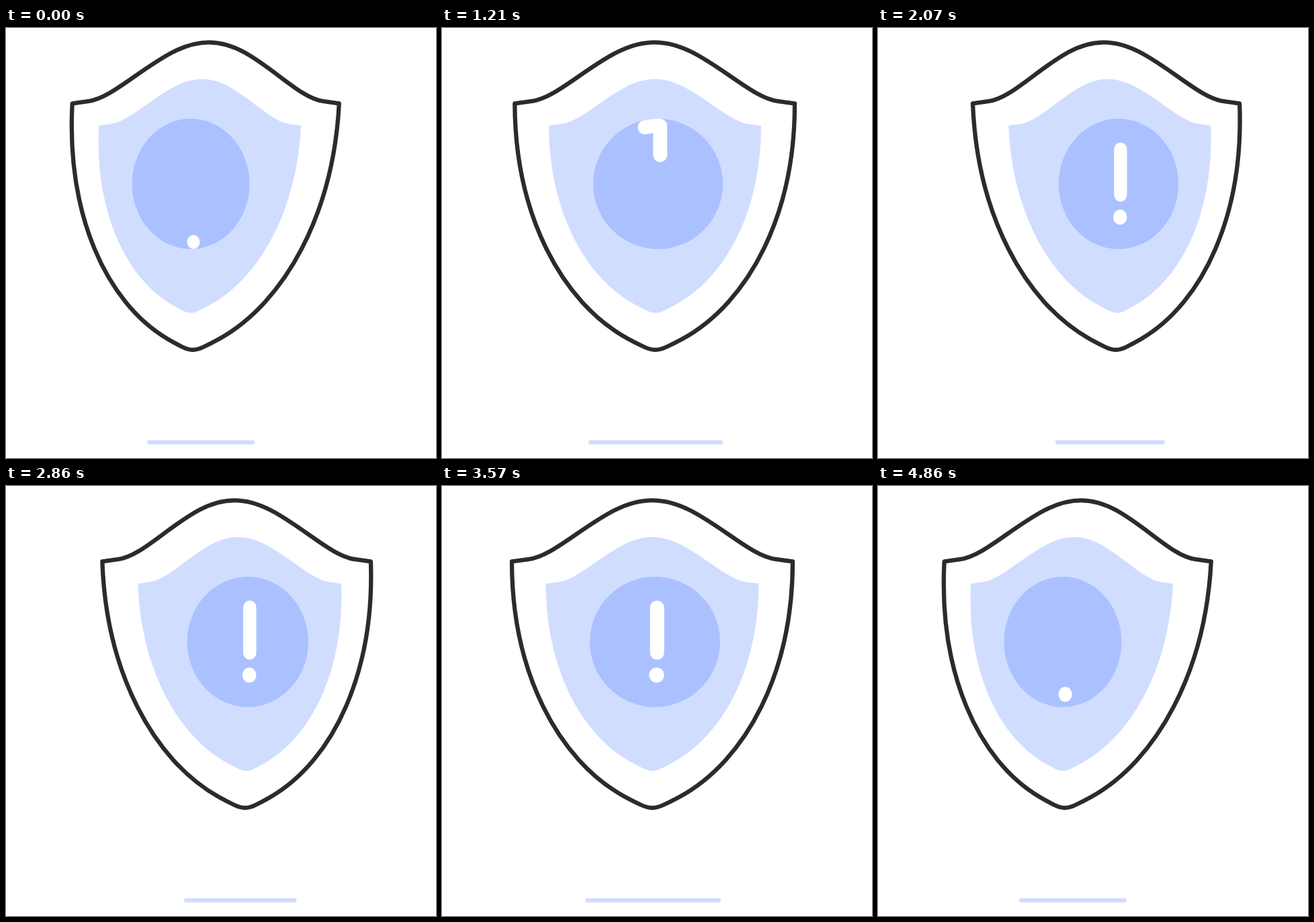
An HTML page for the animation above (4.93 s loop, 640 by 640 pixels).

```html
<!DOCTYPE html>
<html lang="en">
<head>
<meta charset="utf-8">
<title>Shield alert</title>
<style>
  html, body { margin: 0; width: 100%; height: 100%; overflow: hidden; background: #fff; }
  svg { display: block; width: 100%; height: 100%; }
</style>
</head>
<body>
<svg viewBox="0 0 640 640">
  <defs>
    <path id="shape" vector-effect="non-scaling-stroke" d="M-209 112.3L-185 109.2C-149 105 -107 62 -56 36C-37 26.5 -19 21.3 0 21.3
      C19 21.3 37 26.5 56 36C107 62 149 105 185 109.2L209 112.3
      C209 276 141 408 40 463Q28 469.500 16 475C10 477.700 5 479 0 479
      C-5 479 -10 477.700 -16 475Q-28 469.500 -40 463C-141 408 -209 276 -209 112.300Z"/>
  </defs>
  <path id="ground" fill="none" stroke="#d1ddff" stroke-width="6.2" stroke-linecap="round"/>
  <use id="outer" href="#shape" fill="#fff" stroke="#2b2a2d" stroke-width="6.3" stroke-linejoin="round"/>
  <use id="inner" href="#shape" fill="#d1ddff"/>
  <g id="badge">
    <circle r="97" fill="#abc1ff"/>
    <path id="line" fill="none" stroke="#fff" stroke-width="21" stroke-linecap="round" stroke-linejoin="round"
      d="M4.5 86.4A86.5 86.5 0 0 1 0 86.5A86.5 86.5 0 0 1 0 -86.5A86.5 86.5 0 0 1 0 86.5A86.5 86.5 0 0 1 0 -86.5A86.5 86.5 0 0 1 3.2 -86.4V49.5"/>
    <circle id="dot" fill="#fff"/>
  </g>
</svg>
<script>
const LOOP = 4930, TOP = 21.3, HEIGHT = 457.7;
const $ = id => document.getElementById(id);
const [ground, outer, inner, badge, line, dot] =
  ['ground', 'outer', 'inner', 'badge', 'line', 'dot'].map($);

// Smooth curve through [time, value] keys without overshoot.
function track(keys) {
  const n = keys.length - 1;
  const rise = i => (keys[i + 1][1] - keys[i][1]) / (keys[i + 1][0] - keys[i][0]);
  const slope = keys.map((_, i) => {
    if (i === 0 || i === n) return 0;
    const a = rise(i - 1), b = rise(i);
    return a * b <= 0 ? 0 : 2 * a * b / (a + b);
  });
  return t => {
    if (t <= keys[0][0]) return keys[0][1];
    if (t >= keys[n][0]) return keys[n][1];
    let i = 0;
    while (t > keys[i + 1][0]) i++;
    const [t0, a] = keys[i], [t1, b] = keys[i + 1];
    const d = t1 - t0, u = (t - t0) / d, v = 1 - u;
    return v * v * (1 + 2 * u) * a + u * u * (3 - 2 * u) * b
      + d * u * v * (v * slope[i] - u * slope[i + 1]);
  };
}

const shift = track([[0, 302], [500, 303.2], [1140, 314], [1210, 316.4], [1710, 326.5], [2070, 336],
  [2290, 340], [2500, 341.3], [2860, 340], [3430, 320], [3570, 313], [4000, 304], [4500, 302.4], [LOOP, 302]]);
const turn = track([[0, -1], [500, -.55], [1140, -.02], [1210, .06], [1710, .9], [2000, 1], [2450, 1],
  [2860, .88], [3430, .1], [3570, 0], [4000, -.6], [4600, -1], [LOOP, -1]]);
const head = track([[0, 0], [500, 581], [1210, 865], [1600, 924], [4150, 924], [4500, 959]]);
const tail = track([[0, 0], [500, 451], [1210, 798], [1600, 857], [4150, 857], [4520, 959]]);
const dotSize = track([[1500, 0], [1800, 11.2]]);
const dotX = track([[4500, 2.5], [LOOP, 4.2]]);
const dotY = track([[4500, 49.5], [4860, 78], [LOOP, 86.5], [5000, 95]]);

// Offsets and squeezes when fully turned left or right.
const LEFT = { skew: -24, top: -10, innerSkew: -17, badge: -31, bar: -13, squeeze: .098, barCut: 21 };
const RIGHT = { skew: 18, top: 6, innerSkew: 14, badge: 18, bar: 8.5, squeeze: .08, barCut: 19.5 };

const place = (el, ...m) => el.setAttribute('transform', `matrix(${m.join(' ')})`);

function draw(t) {
  const x = shift(t), k = turn(t), q = Math.abs(k), side = k < 0 ? LEFT : RIGHT;
  const wide = 1 - .05 * q;

  let c = side.skew * q / HEIGHT;
  place(outer, wide, 0, c, 1, x - c * TOP, 0);
  c = side.innerSkew * q / HEIGHT;
  place(inner, .758 * wide, 0, c, .76, x + side.top * q - c * TOP, 59.9);
  place(badge, 1 - side.squeeze * q, 0, 0, 1, x + 4 + side.badge * q, 232);

  const mid = x + 1 + side.bar * q, half = 98 - side.barCut * q;
  ground.setAttribute('d', `M${mid - half} 616.6H${mid + half}`);

  const a = tail(t);
  line.setAttribute('stroke-dasharray', `${Math.max(head(t) - a, .01)} 2000`);
  line.setAttribute('stroke-dashoffset', -a);
  line.setAttribute('visibility', t < 4520 ? 'visible' : 'hidden');

  dot.setAttribute('r', dotSize(t));
  dot.setAttribute('cx', dotX(t));
  dot.setAttribute('cy', dotY(t));
}

function tick() {
  draw(performance.now() % LOOP);
  requestAnimationFrame(tick);
}
tick();
</script>
</body>
</html>
```
